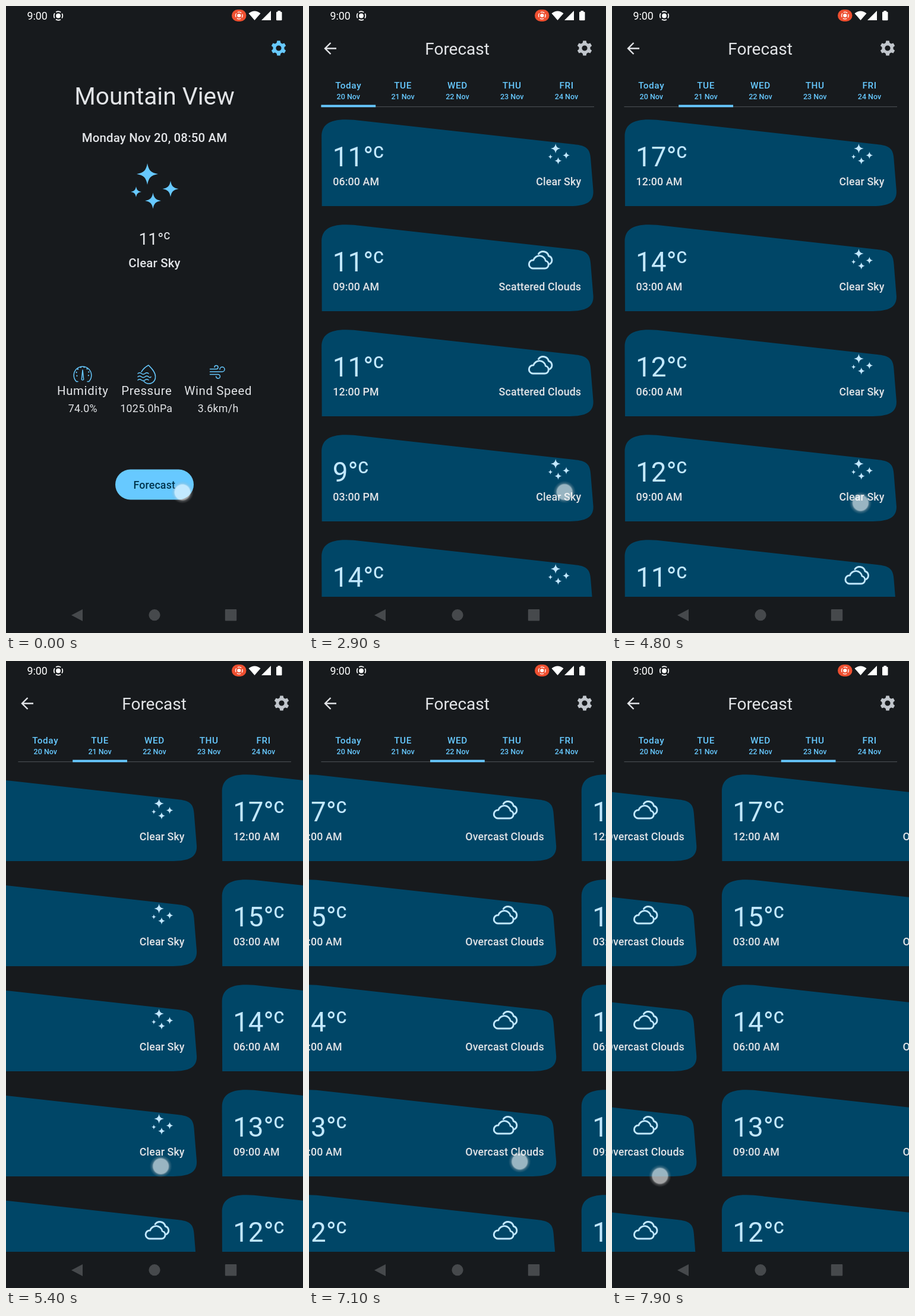
Recreate the animation shown at these times as an HTML page. Size 500 px wide and 1056 px high, loop 8 s.

```html
<!DOCTYPE html>
<html lang="en">
<head>
<meta charset="utf-8">
<title>Weather forecast</title>
<style>
  html, body { margin: 0; width: 100%; height: 100%; overflow: hidden; background: #171a1d; }
  svg { display: block; width: 500px; height: 1056px; }
  text { font-family: Roboto, sans-serif; fill: #e2e4e7; }
  .mid { text-anchor: middle; }
  .end { text-anchor: end; }
  .headline { font-size: 40.7px; }
  .title { font-size: 28px; }
  .subtitle { font-size: 20.4px; font-weight: 500; letter-spacing: .19px; }
  .body { font-size: 20.4px; letter-spacing: .64px; }
  .value { font-size: 17.8px; letter-spacing: .32px; }
  .label { font-size: 17.8px; font-weight: 500; letter-spacing: .127px; }
  .day { font-size: 15.3px; font-weight: 500; letter-spacing: .64px; fill: #67c9ff; }
  .date { font-size: 12.5px; font-weight: 500; fill: #67c9ff; }
  .temp { font-size: 45.8px; fill: #c2e8ff; }
  .unit { font-size: .59em; font-weight: 500; }
  .blue { fill: #67c9ff; }
  .pale { fill: #c2e8ff; }
  .line { fill: none; stroke-linecap: round; stroke-linejoin: round; }
</style>
</head>
<body>
<svg viewBox="0 0 500 1056">
  <defs>
    <radialGradient id="glow">
      <stop offset=".66" stop-color="#fff" stop-opacity=".6"/>
      <stop offset=".78" stop-color="#ccc" stop-opacity=".25"/>
      <stop offset="1" stop-color="#aaa" stop-opacity="0"/>
    </radialGradient>
    <clipPath id="viewport"><path d="M0 175H500V995H0Z"/></clipPath>
    <path id="tooth" d="M-2.6-12.5H2.6L3.8-7H-3.8Z"/>
    <g id="gear">
      <circle r="7.1" fill="none" stroke="currentColor" stroke-width="5"/>
      <g id="teeth" fill="currentColor"></g>
    </g>
    <path id="star" d="M0-1C.13-.33.33-.13 1 0C.33.13.13.33 0 1C-.13.33-.33.13-1 0C-.33-.13-.13-.33 0-1Z"/>
    <g id="clear">
      <use href="#star" transform="translate(-12 -21) scale(18)"/>
      <use href="#star" transform="translate(27 4) scale(13.5)"/>
      <use href="#star" transform="translate(-2.5 24) scale(13.5)"/>
      <use href="#star" transform="translate(-31 9) scale(9)"/>
    </g>
    <g id="clouds" class="line" stroke="#c2e8ff" stroke-width="2.9">
      <path d="M-13 13H7A6.5 6.5 0 0 0 8.5 .2A10.6 10.6 0 0 0-12-1A7 7 0 0 0-13 13Z"/>
      <path d="M-3.5-11.5A9.5 9.5 0 0 1 13.5-8A7.4 7.4 0 0 1 15.5 5.5"/>
    </g>
    <path id="card" fill="#004667" d="M22.5 337L22 220C22 199 36 188.5 76 191.7L447 233C466 235 474 239 475 257L479.4 311C480.5 330 467 337 440 337Z"/>
    <g id="record">
      <circle r="7.3" fill="none" stroke="#fff" stroke-width="1.7" stroke-dasharray="8.5 2.97" stroke-dashoffset="4.2"/>
      <circle r="3.9" fill="#fff"/>
    </g>
  </defs>

  <g id="home">
    <use href="#gear" x="459" y="71" color="#67c9ff"/>
    <text class="mid headline" x="250" y="166">Mountain View</text>
    <text class="mid subtitle" x="250" y="229">Monday Nov 20, 08:50 AM</text>
    <use href="#clear" x="250" y="304" class="blue"/>
    <text class="title" x="223.5" y="401.5">11°<tspan class="unit" dy="-8.5">C</tspan></text>
    <text class="mid subtitle" x="250" y="440">Clear Sky</text>

    <g class="line" stroke="#67c9ff" stroke-width="1.5">
      <path d="M121 632.5H118.5A14.8 14.8 0 1 1 139.5 632.5H137"/>
      <path d="M119.5 623A10.5 10.5 0 1 1 138.5 623" stroke-width="2" stroke-dasharray=".5 5.3"/>
      <path d="M129 613L127.3 629A1.9 1.9 0 0 0 130.7 629Z"/>
      <path d="M228 616C231 611 236 607 240 605C246 611 251.500 617 251.500 624A11 11 0 0 1 232 632"/>
      <path d="M222 619q3-2.500 6 0t6 0t6 0M222 624.500q3-2.500 6 0t6 0t6 0t4 0M222 630q3-2.500 6 0t6 0t6 0"/>
      <path d="M343.500 611.500H354a3 3 0 1 0-3-3M343.500 616H364a4 4 0 1 0-4-4M343.500 620.500H357a3.400 3.400 0 1 1-3.400 3.400"/>
    </g>
    <text class="mid body" x="129.300" y="654.500">Humidity</text>
    <text class="mid body" x="236.800" y="654.500">Pressure</text>
    <text class="mid body" x="357.200" y="654.500">Wind Speed</text>
    <text class="mid value" x="129.300" y="684">74.0%</text>
    <text class="mid value" x="236.300" y="684">1025.0hPa</text>
    <text class="mid value" x="357.200" y="684">3.6km/h</text>

    <rect class="blue" x="184" y="780.500" width="132" height="51" rx="25.500"/>
    <text class="mid label" x="249.800" y="812.500" style="fill:#00344c">Forecast</text>
  </g>

  <g id="forecast">
    <path class="line" style="stroke-linecap:butt;stroke-linejoin:miter" stroke="#e2e4e7" stroke-width="2.400" d="M46 71.500H27.500M36.500 62L27 71.500L36.500 81"/>
    <text class="mid title" x="249.600" y="82">Forecast</text>
    <use href="#gear" x="464" y="71" color="#c1c6cc"/>
    <path d="M20.400 169.700H480" stroke="#454a4e" stroke-width="1.300"/>
    <g id="tabs"></g>
    <rect id="indicator" class="blue" y="166.500" width="91.800" height="3.900"/>
    <g id="list" clip-path="url(#viewport)"><g id="pager"></g></g>
  </g>

  <text class="value" x="35.500" y="23" style="letter-spacing:0;fill:#fff">9:00</text>
  <use href="#record" x="88" y="16.500"/>
  <rect x="380" y="6" width="24.500" height="20" rx="10" fill="#ee4f30"/>
  <use href="#record" transform="translate(392.300 16) scale(.8)"/>
  <path fill="#fff" d="M408.500 12.500Q418.500 4.500 428.500 12.500L418.500 24ZM430 24L446 8V24ZM455 11Q455 9.700 456.300 9.700H457.500V8H462V9.700H463.200Q464.500 9.700 464.500 11V23Q464.500 24.300 463.200 24.300H456.300Q455 24.300 455 23Z"/>
  <g fill="#46494c">
    <path d="M110 1026L129 1016V1036Z"/>
    <circle cx="250" cy="1025.700" r="9.600"/>
    <rect x="368.800" y="1016" width="19.400" height="19.400" rx="1"/>
  </g>
  <circle id="touch" r="19" fill="url(#glow)"/>
</svg>

<script>
const LOOP = 8000, PAGE = 500, TAB = 91.8, ROW = 177;
const $ = id => document.getElementById(id);
const clamp = v => Math.min(1, Math.max(0, v));

const days = ['Today', 'TUE', 'WED', 'THU', 'FRI'];
const clear = 'Clear Sky', scattered = 'Scattered Clouds', overcast = 'Overcast Clouds';
const pages = [
  { from: 6, temps: [11, 11, 11, 9, 14], sky: [clear, scattered, scattered, clear, clear] },
  { from: 0, temps: [17, 14, 12, 12, 11], sky: [clear, clear, clear, clear, 'Few Clouds'] },
  { from: 0, temps: [17, 15, 14, 13, 12], sky: Array(5).fill(overcast) },
  { from: 0, temps: [17, 15, 14, 13, 12], sky: Array(5).fill(overcast) },
];

// Finger drags: path holds [ms since start, distance]; turn is when the next tab is selected.
const swipes = [
  { start: 2890, release: 3900, turn: 3600, x: 431, y: 818.5,
    path: [[0, 0], [200, 15], [450, 120], [710, 250], [910, 352], [1010, 405]] },
  { start: 4790, release: 5800, turn: 5650, x: 419, y: 837,
    path: [[0, 0], [200, 10], [610, 158], [860, 250], [1010, 355]] },
  { start: 6790, release: LOOP, turn: 7750, x: 418, y: 837.5,
    path: [[0, 0], [150, 12], [310, 63], [700, 165], [960, 250], [1110, 336.5], [1210, 400]] },
];

function hour(h) {
  return `${String(h % 12 || 12).padStart(2, '0')}:00 ${h < 12 ? 'AM' : 'PM'}`;
}

function card(page, row) {
  const sky = page.sky[row];
  const icon = sky === clear
    ? '<use href="#clear" class="pale" transform="translate(421.5 249.700) scale(.46)"/>'
    : `<use href="#clouds" x="${{ [scattered]: 390.7, [overcast]: 394 }[sky] || 413}" y="252"/>`;
  return `<g transform="translate(0 ${row * ROW})"><use href="#card"/>
    <text class="temp" x="40.500" y="270">${page.temps[row]}°<tspan class="unit" dy="-14">C</tspan></text>
    <text class="label" x="41" y="301.500">${hour(page.from + row * 3)}</text>
    ${icon}<text class="label end" x="459" y="301.500">${sky}</text></g>`;
}

$('teeth').innerHTML = [0, 60, 120, 180, 240, 300]
  .map(a => `<use href="#tooth" transform="rotate(${a})"/>`).join('');
$('tabs').innerHTML = days.map((day, i) => {
  const x = 66.3 + i * TAB;
  return `<text class="mid day" x="${x}" y="138.500">${day}</text>
    <text class="mid date" x="${x}" y="156.500">${20 + i} Nov</text>`;
}).join('');
$('pager').innerHTML = pages.map((page, i) =>
  `<g transform="translate(${i * PAGE} 0)">${page.temps.map((_, row) => card(page, row)).join('')}</g>`).join('');

// cubic-bezier(.4, 0, .2, 1)
function ease(p) {
  let lo = 0, hi = 1;
  for (let i = 0; i < 20; i++) {
    const u = (lo + hi) / 2, v = 1 - u;
    if (1.2 * v * v * u + .6 * v * u * u + u ** 3 < p) lo = u; else hi = u;
  }
  return lo * lo * (3 - 2 * lo);
}

function along(path, t) {
  const i = Math.max(1, path.findIndex(([end]) => end >= t));
  const [t0, d0] = path[i - 1], [t1, d1] = path[i];
  return d0 + (d1 - d0) * clamp((t - t0) / (t1 - t0));
}

// Critically damped spring that carries the finger's speed on to the next page.
function settle(rest, s) {
  return PAGE - (rest + (20 * rest - 500) * s) * Math.exp(-20 * s);
}

function place(x, y) {
  $('touch').setAttribute('cx', x);
  $('touch').setAttribute('cy', y);
  $('touch').style.display = '';
}

function draw(t) {
  let scroll = 0, tab = 0;
  $('touch').style.display = 'none';
  if (t < 90) place(297, 819);
  for (const s of swipes) {
    if (t < s.start) break;
    if (t < s.release) {
      const d = along(s.path, t - s.start);
      place(s.x - d, s.y + d * .088);
      scroll += d;
    } else {
      scroll += settle(PAGE - s.path.at(-1)[1], (t - s.release) / 1000);
    }
    tab += ease(clamp((t - s.turn) / 250));
  }
  const shown = ease(clamp((t - 50) / 450));
  $('home').style.opacity = 1 - shown;
  $('forecast').style.opacity = shown;
  $('list').style.opacity = clamp((t - 720) / 360);
  $('pager').setAttribute('transform', `translate(${-scroll} 0)`);
  $('indicator').setAttribute('x', 20.4 + tab * TAB);
}

function tick() {
  draw(performance.now() % LOOP);
  requestAnimationFrame(tick);
}
tick();
</script>
</body>
</html>
```
